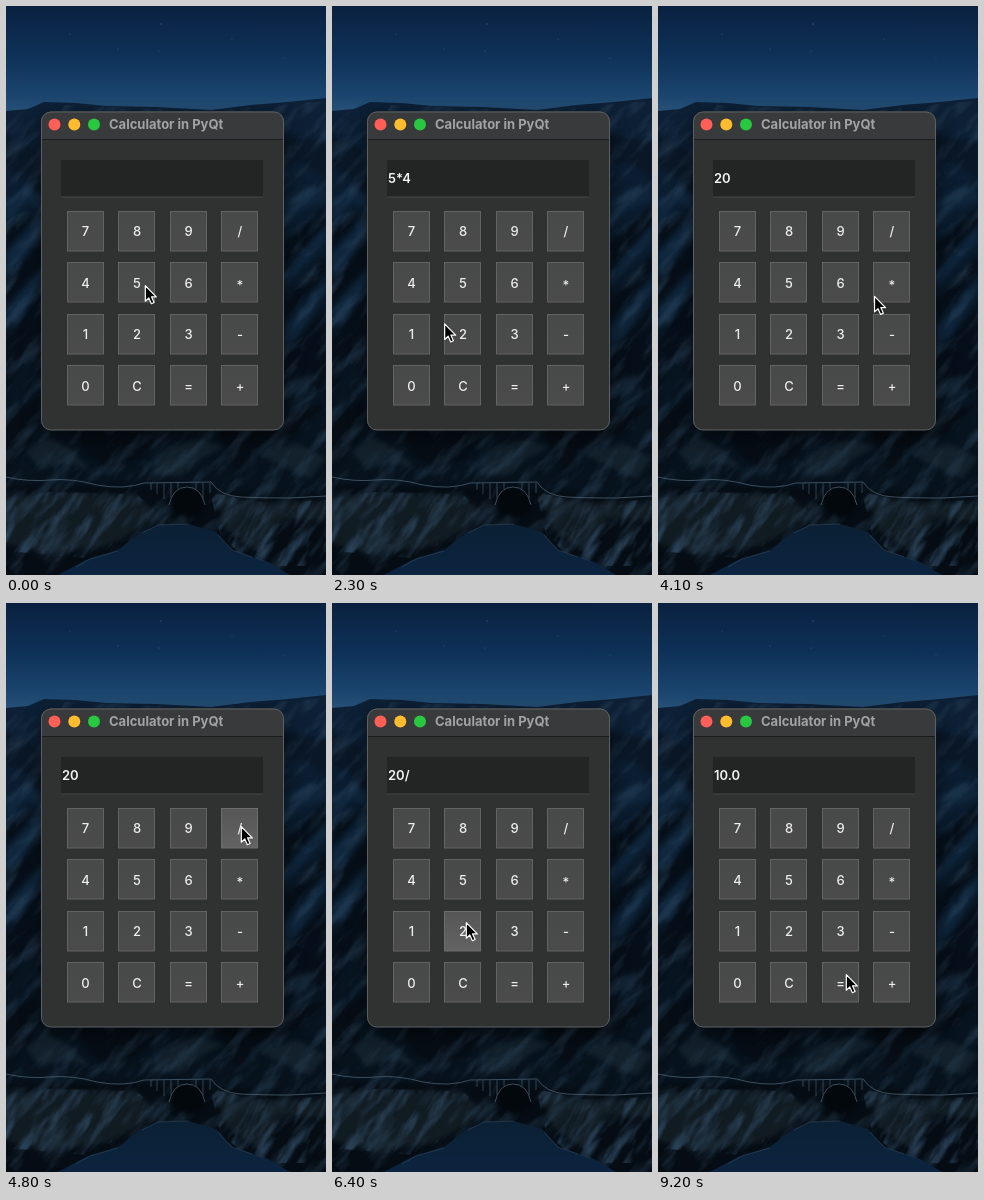
Recreate the animation shown at these times as an HTML page. Size 320x569 px, loop 9.3 s.

```html
<!DOCTYPE html>
<html lang="en">
<head>
<meta charset="utf-8">
<title>Calculator in PyQt</title>
<style>
html, body { margin: 0; width: 100%; height: 100%; overflow: hidden; background: #07111d; }
svg { position: absolute; left: 0; top: 0; width: 320px; height: 569px; }
#scene { will-change: transform; }
filter { color-interpolation-filters: sRGB; }
text { font: 500 13px Inter, sans-serif; font-feature-settings: "calt" 0; fill: #ededed; }
#display { font-weight: 600; fill: #f4f4f4; }
.key text { text-anchor: middle; }
.key rect { fill: url(#key); stroke: #626363; }
.key.down rect { fill: url(#down); stroke: #6c6d6d; }
.title { font-weight: 700; fill: #a2a3a3; }
</style>
</head>
<body>
<svg id="scene" viewBox="0 0 320 569">
  <defs>
    <linearGradient id="sky" x2="0" y2="1">
      <stop stop-color="#0a2140"/><stop offset=".45" stop-color="#0e3158"/><stop offset=".8" stop-color="#1a446d"/><stop offset="1" stop-color="#2a547a"/>
    </linearGradient>
    <linearGradient id="land" x2="0" y2="1">
      <stop stop-color="#0d2036"/><stop offset=".3" stop-color="#0a1b2c"/><stop offset=".7" stop-color="#07131e"/><stop offset="1" stop-color="#060f18"/>
    </linearGradient>
    <linearGradient id="sea" x2="0" y2="1">
      <stop stop-color="#0b2034"/><stop offset="1" stop-color="#0c2440"/>
    </linearGradient>
    <filter id="soft"><feGaussianBlur stdDeviation="2"/></filter>
    <filter id="shadow" x="-30%" y="-30%" width="160%" height="160%"><feGaussianBlur stdDeviation="10"/></filter>
    <filter id="rock" x="0" y="0" width="100%" height="100%">
      <feTurbulence type="fractalNoise" baseFrequency=".022 .08" numOctaves="4" seed="5"/>
      <feColorMatrix values="0 0 0 0 .2  0 0 0 0 .31  0 0 0 0 .41  3 0 0 0 -1.4"/>
    </filter>
    <clipPath id="ground"><path d="M0 106L38 98 100 101 205 105 282 98 320 95V569H0z"/></clipPath>
    <clipPath id="cliffs"><path d="M0 492L44 486 130 488 150 505 130 526 108 538 80 552 0 545zM204 486L250 496 320 494V560H270L232 546 214 528z"/></clipPath>
  </defs>

  <rect width="320" height="110" fill="url(#sky)"/>
  <g fill="#54779d" opacity=".6">
    <circle cx="155" cy="18" r=".7"/><circle cx="112" cy="43" r=".6"/><circle cx="153" cy="45" r=".6"/>
    <circle cx="64" cy="28" r=".5"/><circle cx="226" cy="33" r=".5"/><circle cx="278" cy="52" r=".5"/>
  </g>
  <path fill="url(#land)" d="M0 105L22 103 38 96 70 97 100 100 150 101 205 104 245 99 282 96 320 92V569H0z"/>
  <g filter="url(#soft)">
    <path fill="#0a1726" d="M0 130L18 136 36 150V194L20 172 0 160zM278 128L320 137V172L297 156 278 158z"/>
    <path fill="#10273d" d="M0 194L20 180 36 190V205L20 196 0 218zM0 248L36 210V224L12 260 0 266zM0 304L36 263V275L14 312 0 322z"/>
    <path fill="#060f19" d="M0 222L36 202 0 243zM0 277L36 234V258L0 298zM0 334L36 287V370L18 351 0 390z"/>
    <path fill="#0f253a" d="M278 194L302 179 320 184V194L296 204 278 222zM278 268L320 220V234L278 282zM278 321L320 273V286L291 332 278 339z"/>
    <path fill="#060f19" d="M278 237L320 200V217L278 263zM278 293L320 248V267L278 314zM278 350L320 300V388L293 371 278 397z"/>
    <path fill="#060d15" d="M0 414L33 390 25 438 0 463zM67 424L155 425 134 451 105 465 81 448zM211 425L320 398 287 430 248 442 233 470z"/>
    <path fill="#13212c" d="M20 445L40 430 66 444 84 464 56 455 35 464zM162 442L193 433 217 441 195 453 174 470 146 468zM251 448L291 437 320 452 304 473 276 460z"/>
    <path fill="#050c13" d="M0 480L144 482 216 485 320 495V569H0z"/>
    <path fill="#111b22" d="M0 492L44 487 130 489 148 505 128 526 100 540 42 548 0 538zM208 488L250 497 320 496V515L277 512 250 545 222 525z"/>
  </g>
  <g clip-path="url(#ground)">
    <rect x="-300" y="-300" width="600" height="700" transform="translate(160 300) rotate(-48)" filter="url(#rock)" opacity=".42"/>
  </g>
  <path fill="url(#sea)" d="M52 569L80 554 112 544 134 527 152 519 182 518 210 526 226 544 262 556 284 569z"/>
  <path fill="none" stroke="#4b6478" opacity=".35" d="M70 561L84 553 112 545M136 527L152 519 182 518M212 529L226 544 246 551"/>
  <g clip-path="url(#cliffs)">
    <rect x="-220" y="-220" width="440" height="440" transform="translate(160 520) rotate(-58)" filter="url(#rock)" opacity=".75"/>
  </g>
  <path fill="#03080d" filter="url(#soft)" d="M164 502L168 484 181 480 196 485 199 502 184 514z"/>
  <g fill="none" stroke="#53697a" opacity=".7">
    <path d="M0 471Q22 476 44 474T91 479Q118 484 138 477L205 476Q214 490 235 491T284 492L320 490"/>
    <path d="M163 499Q167 481 181 481T199 499"/>
    <path d="M145 477V484M151 477V488M158 477V493M165 477V492M172 477V483M190 477V483M197 477V492M204 477V487" opacity=".8"/>
  </g>
  <rect x="35" y="112" width="243" height="320" rx="10" opacity=".5" filter="url(#shadow)"/>
</svg>

<svg viewBox="0 0 320 569">
  <defs>
    <linearGradient id="key" x2="0" y2="1">
      <stop stop-color="#484949"/><stop offset="1" stop-color="#4b4b4b"/>
    </linearGradient>
    <linearGradient id="down" x2="0" y2="1">
      <stop stop-color="#565656"/><stop offset="1" stop-color="#636363"/>
    </linearGradient>
    <clipPath id="frame"><rect x="35" y="105.500" width="243" height="318.500" rx="10"/></clipPath>
  </defs>
  <g clip-path="url(#frame)">
    <rect x="35" y="105" width="243" height="320" fill="#303131"/>
    <rect x="35" y="105" width="243" height="28" fill="#393a3b"/>
    <path d="M35 133.500H278" stroke="#1b1c1c"/>
  </g>
  <rect x="35.500" y="106" width="242" height="318" rx="9.500" fill="none" stroke="#5c6062"/>
  <circle cx="48.500" cy="118.500" r="6" fill="#ff5f57"/>
  <circle cx="68.300" cy="118.500" r="6" fill="#febc2e"/>
  <circle cx="88" cy="118.500" r="6" fill="#28c840"/>
  <text class="title" x="103" y="123">Calculator in PyQt</text>
  <rect x="55" y="154" width="202" height="37" fill="#232424"/>
  <path d="M55 191H257" stroke="#484949"/>
  <text id="display" x="56" y="177"></text>
  <g id="keys"></g>
  <path id="cursor" stroke="#fff" stroke-width="1.200" stroke-linejoin="round"
    d="M.3 .7V16.200L3.800 13 6.400 18.700 9.100 17.500 6.600 11.900H11.300z"/>
</svg>
<script>
const LOOP = 9300, STEP = 100;
const $ = id => document.getElementById(id);

// Press time, release time, key, display after release
const clicks = [
  [100, 300, '5', '5'],
  [700, 900, '*', '5*'],
  [1500, 1700, '4', '5*4'],
  [3200, 3400, '=', '20'],
  [4700, 4900, '/', '20/'],
  [6300, 6500, '2', '20/2'],
  [7800, 8000, '=', '10.0']
];

// Time, x, y of the pointer tip
const path = [
  [0, 139, 279], [300, 139, 279], [650, 234, 279], [900, 234, 279],
  [1300, 79, 289], [1900, 79, 289], [3000, 190, 383], [3600, 190, 383],
  [4500, 235, 223], [5100, 235, 223], [6100, 134, 319], [6700, 134, 319],
  [7600, 188, 371], [LOOP, 188, 371]
];

const keys = [...'789/456*123-0C=+'].map((label, i) => {
  const x = 61 + i % 4 * 51.5, y = 205 + (i >> 2) * 51.6;
  const g = document.createElementNS('http://www.w3.org/2000/svg', 'g');
  g.setAttribute('class', 'key');
  g.innerHTML = `<rect x="${Math.floor(x) + .5}" y="${Math.floor(y) + .5}" width="36" height="39.500"/>
    <text x="${x + 18.5}" y="${y + (label === '*' ? 27 : 25)}">${label}</text>`;
  $('keys').append(g);
  return { label, g };
});

function pointerAt(t) {
  const i = path.findIndex(p => p[0] > t);
  const [t0, x0, y0] = path[i - 1], [t1, x1, y1] = path[i];
  const u = (t - t0) / (t1 - t0), e = u * u * (3 - 2 * u);
  return [x0 + (x1 - x0) * e, y0 + (y1 - y0) * e];
}

function draw(now) {
  const t = Math.floor(now % LOOP / STEP) * STEP;
  const pressed = clicks.find(([from, to]) => t >= from && t < to);
  const done = clicks.filter(c => t >= c[1]).pop();
  $('display').textContent = done ? done[3] : '';
  for (const { label, g } of keys) g.classList.toggle('down', !!pressed && pressed[2] === label);
  $('cursor').setAttribute('transform', `translate(${pointerAt(t)})`);
}

function tick() {
  draw(performance.now());
  requestAnimationFrame(tick);
}
tick();
</script>
</body>
</html>
```
